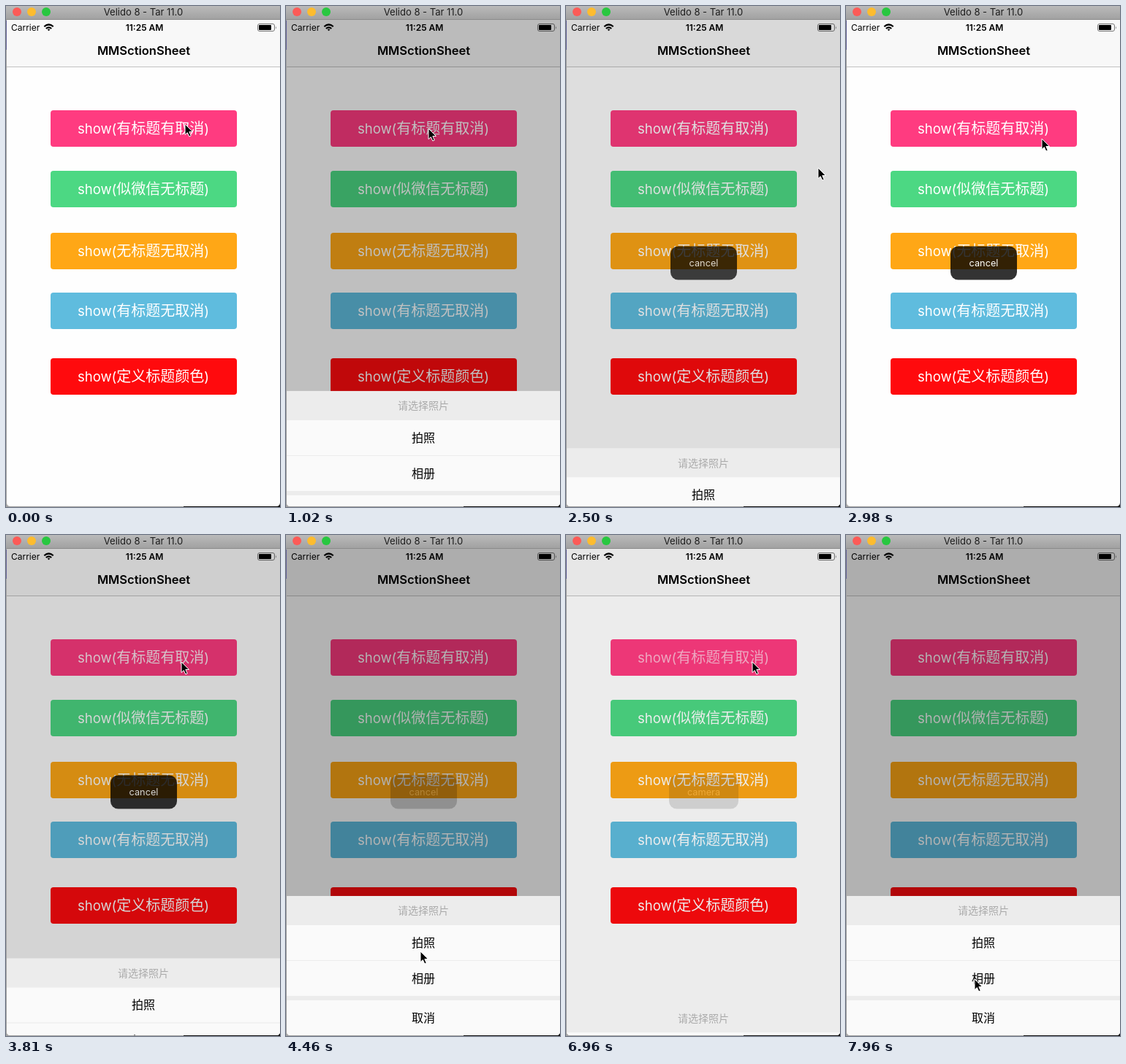
These frames come from a looping animation (375 px wide and 687 px high, 8000 ms). An HTML page:

```html
<!DOCTYPE html>
<html lang="zh">
<head>
<meta charset="utf-8">
<title>Action sheet demo</title>
<style>
  html, body { margin: 0; width: 100%; height: 100%; overflow: hidden; background: #fff; }
  svg { display: block; width: 375px; height: 687px; }
  text { font-family: Inter, sans-serif; text-anchor: middle; }
  .cjk { font-family: "Noto Sans CJK SC", "Noto Sans CJK", sans-serif; }
  .label { font-size: 20px; fill: #fff; }
  .latin { font-family: Inter, sans-serif; font-size: 18.5px; }
</style>
</head>
<body>
<svg viewBox="0 0 375 687">
  <defs>
    <linearGradient id="bar" x2="0" y2="1">
      <stop offset="0" stop-color="#bababa"/>
      <stop offset="1" stop-color="#a0a0a0"/>
    </linearGradient>
    <clipPath id="screen"><path d="M1 19H375V681q0 5-5 5H6q-5 0-5-5z"/></clipPath>
  </defs>

  <!-- desktop behind the window -->
  <rect width="375" height="687" fill="#a3a3a3"/>
  <path d="M243 680H375V687H243z" fill="#111"/>
  <path d="M0 20h1v40h-1z" fill="#66659a"/>

  <!-- window bar -->
  <rect width="375" height="19" fill="url(#bar)"/>
  <path d="M0 18.5H375" stroke="#8c8c8c"/>
  <circle cx="15" cy="8" r="6" fill="#fc5b57"/>
  <circle cx="35" cy="8" r="6" fill="#fdbc2f"/>
  <circle cx="55" cy="8" r="6" fill="#29c740"/>
  <text x="188" y="13" font-size="13" fill="#1c1c1c">Velido 8 - Tar 11.0</text>

  <g clip-path="url(#screen)">
    <rect y="19" width="375" height="668" fill="#fefefe"/>
    <rect y="19" width="375" height="64" fill="#f8f8f8"/>
    <path d="M0 83.5H375" stroke="#c2c2c2"/>
    <text x="7" y="33.5" font-size="12" style="text-anchor:start">Carrier</text>
    <path d="M52.3 28.3q6.2-5.6 12.4 0M54.8 31q3.7-3.2 7.4 0" fill="none" stroke="#000" stroke-width="2.2"/>
    <path d="M56.7 32.2q1.8-1.4 3.6 0l-1.8 2z"/>
    <text x="189.5" y="33.5" font-size="12" font-weight="600">11:25 AM</text>
    <rect x="344.5" y="24.5" width="23" height="10" rx="2.5" fill="none" stroke="#777"/>
    <rect x="346" y="26" width="17" height="7" rx="1"/>
    <path d="M369 27.5q1.5 2 0 4z" fill="#777"/>
    <text x="188.5" y="67" font-size="16.5" font-weight="600">MMSctionSheet</text>

    <g id="buttons"></g>

    <g id="toast">
      <rect id="toastBox" y="329.5" height="46" rx="10.5" fill-opacity=".8"/>
      <text id="toastText" x="188.5" y="357" font-size="12.75" fill="#fff"></text>
    </g>

    <rect id="dim" y="19" width="375" height="668"/>

    <g id="sheet">
      <rect y="495" width="375" height="192" fill="#ececec"/>
      <path d="M0 535H375V583H0zM0 584H375V632H0zM0 638H375V687H0z" fill="#fafafa"/>
      <text class="cjk" x="188" y="520.3" font-size="14" fill="#aaa">请选择照片</text>
      <g font-size="16">
        <text class="cjk" x="188" y="565">拍照</text>
        <text class="cjk" x="188" y="614">相册</text>
        <text class="cjk" x="188" y="668">取消</text>
      </g>
    </g>
  </g>

  <path id="cursor" d="M0 0V14.6L3.3 11.6L5.8 17L8.2 16L5.8 10.5H10.4z" stroke="#fff"/>
</svg>

<script>
const LOOP = 8000;
const SLIDE = 300;       // sheet in or out
const RELEASE = 200;     // label regains its brightness
const TOAST_STAY = 1975;

const $ = id => document.getElementById(id);
const set = (id, attrs) => {
  for (const name in attrs) $(id).setAttribute(name, attrs[name]);
};
const ramp = (t, start, length) => Math.max(0, Math.min(1, (t - start) / length));
const ease = v => v * v * (3 - 2 * v);
const rise = (t, start, length) => ease(ramp(t, start, length));

const buttons = [
  { top: 143, color: '#ff3b80', label: '有标题有取消' },
  { top: 226, color: '#4cd883', label: '似微信无标题' },
  { top: 311, color: '#ffa716', label: '无标题无取消' },
  { top: 393, color: '#5fbcde', label: '有标题无取消' },
  { top: 483, color: '#ff0a0d', label: '定义标题颜色' }
];
$('buttons').innerHTML = buttons.map(({ top, color, label }) =>
  `<rect x="61" y="${top}" width="255" height="50" rx="4" fill="${color}"/>
   <text class="label cjk" x="188" y="${top + 32}"><tspan class="latin">show(</tspan>${label}<tspan class="latin">)</tspan></text>`
).join('');
$('buttons').querySelector('text').id = 'firstLabel';

// Each visit: press the first button, the sheet opens, a choice closes it.
const visits = [
  { press: 630, open: 800, close: 2335, answer: 'cancel', width: 91 },
  { press: 3450, open: 3650, close: 4820, answer: 'camera', width: 95 },
  { press: 6660, open: 6867, close: Infinity }
];

// Pointer stops: arrival time and place. Longer trips take longer.
const stops = [
  [0, 245, 162], [210, 195, 168], [1700, 315, 264], [1974, 345, 222],
  [2980, 268, 182], [3400, 240, 174], [4460, 184, 571], [5120, 198, 508],
  [5500, 337, 243], [6200, 361, 240], [6560, 255, 174], [7420, 214, 572], [7960, 176, 609]
];

function pointerAt(t) {
  let [, x, y] = stops[0];
  for (const [arrive, toX, toY] of stops.slice(1)) {
    const trip = 170 + 0.6 * Math.hypot(toX - x, toY - y);
    const k = rise(t, arrive - trip, trip);
    x += (toX - x) * k;
    y += (toY - y) * k;
    if (k < 1) break;
  }
  return [x, y];
}

function draw(t) {
  let shown = 0, labelOpacity = 1, toastOpacity = 0;
  for (const { press, open, close, answer, width } of visits) {
    shown += rise(t, open, SLIDE) - rise(t, close, SLIDE);
    if (t >= press) labelOpacity = 0.2 + 0.8 * ramp(t, open - 10, RELEASE);
    if (answer && t >= close) {
      toastOpacity = rise(t, close, 200) - rise(t, close + TOAST_STAY, 220);
      $('toastText').textContent = answer;
      set('toastBox', { x: 188.5 - width / 2, width });
    }
  }
  set('cursor', { transform: `translate(${pointerAt(t)})` });
  set('firstLabel', { opacity: labelOpacity });
  set('toast', { opacity: toastOpacity });
  set('dim', { opacity: 0.3 * shown });
  set('sheet', { transform: `translate(0 ${192 * (1 - shown)})` });
}

function tick(now) {
  draw(now % LOOP);
  requestAnimationFrame(tick);
}
draw(0);
requestAnimationFrame(tick);
</script>
</body>
</html>
```
